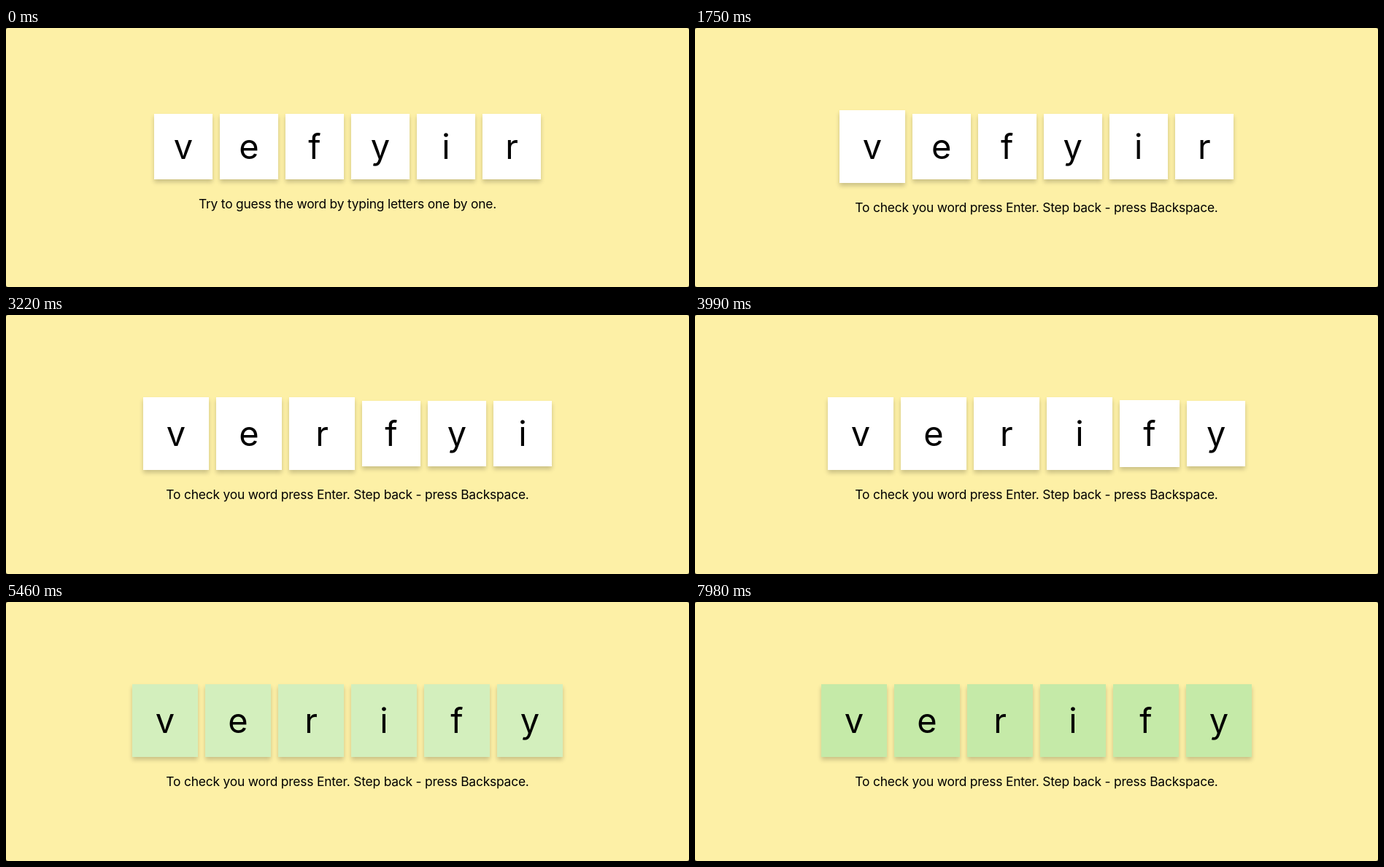
Write an HTML page that moves like this. It is 936x356 px and loops after 8.26 s.

```html
<!DOCTYPE html>
<html lang="en">
<head>
<meta charset="utf-8">
<title>Guess the word</title>
<style>
  html, body { margin: 0; width: 100%; height: 100%; overflow: hidden; background: #55513a; }
  #stage {
    position: relative; width: 936px; height: 356px; overflow: hidden;
    border-radius: 3px; background: #fdf0a6; color: #000;
    font-family: Inter, sans-serif;
  }
  #row {
    position: absolute; left: 0; top: 113px; width: 100%; height: 100px;
    display: flex; justify-content: center; align-items: center; gap: 10px;
  }
  .card {
    flex: none; text-align: center; font-size: 47px;
    box-shadow: 0 4px 6px rgba(0, 0, 0, .2);
  }
  #hint {
    position: absolute; left: 0; width: 100%; text-align: center; white-space: nowrap;
    font-size: 17.4px; line-height: 20px; letter-spacing: -.2px;
  }
</style>
</head>
<body>
<div id="stage">
  <div id="row"></div>
  <div id="hint"></div>
</div>
<script>
const LOOP = 8260, GROW = 300, TINT = 1000, CHECKED = 5000;
const PRESSES = [1530, 2080, 2450, 3620, 3940, 4255];
const GREEN = [197, 234, 168];
const row = document.getElementById('row');
const hint = document.getElementById('hint');

const cards = PRESSES.map(() => {
  const card = document.createElement('div');
  card.className = 'card';
  row.append(card);
  return card;
});

// CSS "ease": cubic-bezier(.25, .1, .25, 1)
function ease(x) {
  if (x <= 0) return 0;
  if (x >= 1) return 1;
  const bezier = (s, a, b) => 3 * (1 - s) ** 2 * s * a + 3 * (1 - s) * s * s * b + s ** 3;
  let lo = 0, hi = 1;
  for (let i = 0; i < 20; i++) {
    const mid = (lo + hi) / 2;
    if (bezier(mid, .25, .25) < x) lo = mid; else hi = mid;
  }
  return bezier(lo, .1, 1);
}

function draw() {
  const t = performance.now() % LOOP;
  const word = t < PRESSES[2] ? 'vefyir' : t < PRESSES[3] ? 'verfyi' : 'verify';
  const tint = ease((t - CHECKED) / TINT);
  const color = `rgb(${GREEN.map(c => Math.round(255 + (c - 255) * tint))})`;

  cards.forEach((card, i) => {
    const extra = 10 * ease((t - PRESSES[i]) / GROW);
    card.textContent = word[i];
    card.style.width = 80 + extra + 'px';
    card.style.height = card.style.lineHeight = 90 + extra + 'px';
    card.style.background = color;
  });

  hint.textContent = t < PRESSES[0]
    ? 'Try to guess the word by typing letters one by one.'
    : 'To check you word press Enter. Step back - press Backspace.';
  hint.style.top = 232 + 5 * ease((t - PRESSES[0]) / GROW) + 'px';
  requestAnimationFrame(draw);
}
draw();
</script>
</body>
</html>
```
